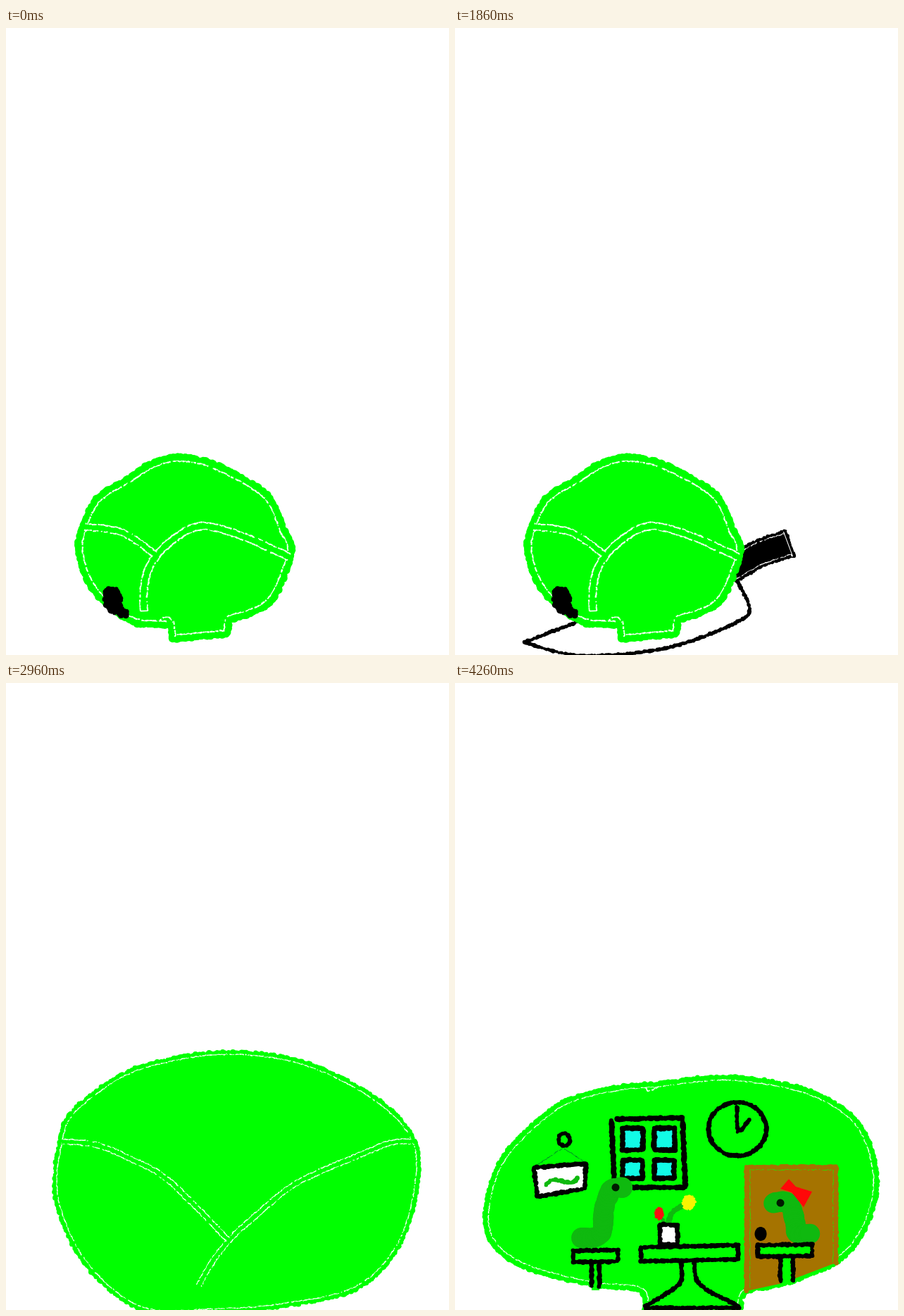
An HTML page with a canvas that plays this animation: 629x890 px, repeating every 5060 ms.

```html
<!DOCTYPE html>
<html lang="en">
<head>
<meta charset="utf-8">
<title>Cabbage</title>
<style>
  html, body { margin: 0; width: 100%; height: 100%; overflow: hidden; background: #fff; }
  canvas { display: block; }
</style>
</head>
<body>
<canvas id="stage" width="629" height="890"></canvas>
<script>
const W = 629, H = 890, LOOP = 5060;
const GREEN = '#00ff00', WORM = '#0fb90f', BROWN = '#a57300', CYAN = '#12fae6', BLACK = '#000';
const stage = document.getElementById('stage').getContext('2d');
let g, seed = 1;

const rnd = () => (seed = (seed * 16807) % 2147483647) / 2147483647;
const jit = a => (rnd() * 2 - 1) * a;
const mix = (a, b, t) => a + (b - a) * t;

function spline(a, b, c, d, t) {
  const curve = 2 * a - 5 * b + 4 * c - d;
  const twist = 3 * (b - c) + d - a;
  return b + t / 2 * (c - a + t * (curve + t * twist));
}

// Points every two pixels along key points given as x, y, x, y ...
function path(keys, { closed = false, straight = false } = {}) {
  const p = [], out = [];
  for (let i = 0; i < keys.length; i += 2) p.push([keys[i], keys[i + 1]]);
  const n = p.length, last = closed ? n : n - 1;
  const at = i => closed ? p[(i + n) % n] : p[Math.max(0, Math.min(n - 1, i))];
  for (let i = 0; i < last; i++) {
    const a = at(i - 1), b = at(i), c = at(i + 1), d = at(i + 2);
    const steps = Math.ceil(Math.hypot(c[0] - b[0], c[1] - b[1]) / 2);
    for (let s = 0; s < steps; s++) {
      const t = s / steps;
      const coord = k => straight ? mix(b[k], c[k], t) : spline(a[k], b[k], c[k], d[k], t);
      out.push([coord(0), coord(1)]);
    }
  }
  out.push(at(last));
  return out;
}

const curve = (...keys) => path(keys);
const ring = (...keys) => path(keys, { closed: true });
const line = (...keys) => path(keys, { straight: true });
const poly = (...keys) => path(keys, { closed: true, straight: true });
const rect = (x, y, w, h, tilt = 0) => poly(x, y, x + w, y + tilt, x + w, y + h + tilt, x, y + h);

function oval(x, y, rx, ry) {
  const out = [];
  for (let a = 0; a < 6.4; a += 2 / Math.max(rx, ry)) out.push([x + rx * Math.cos(a), y + ry * Math.sin(a)]);
  return out;
}

// Shifts a path sideways; positive is inward on a clockwise outline.
function shift(pts, d) {
  return pts.map(([x, y], i) => {
    const a = pts[Math.max(0, i - 2)], b = pts[Math.min(pts.length - 1, i + 2)];
    const dx = b[0] - a[0], dy = b[1] - a[1], len = Math.hypot(dx, dy) || 1;
    return [x - dy / len * d, y + dx / len * d];
  });
}

function crayon(pts, width, color = BLACK, rough = 1) {
  g.fillStyle = color;
  for (const [x, y] of pts) {
    g.beginPath();
    g.arc(x + jit(rough * .7), y + jit(rough * .7), width / 2 + jit(rough * .7), 0, 7);
    g.fill();
  }
}

function fill(pts, color) {
  g.fillStyle = color;
  g.beginPath();
  for (const [x, y] of pts) g.lineTo(x, y);
  g.fill();
}

function shape(pts, width, color, edge = BLACK, rough = 1) {
  fill(pts, color);
  crayon(pts, width, edge, rough);
}

// Thin broken line; without a colour it cuts through to the page.
function thread(pts, width, color) {
  g.save();
  if (!color) g.globalCompositeOperation = 'destination-out';
  g.strokeStyle = color || BLACK;
  let last;
  for (const [x, y] of pts) {
    const next = [x + jit(.8), y + jit(.8)];
    if (last && rnd() > .13) {
      g.lineWidth = width * (.55 + rnd() * .8);
      g.beginPath();
      g.moveTo(...last);
      g.lineTo(...next);
      g.stroke();
    }
    last = next;
  }
  g.restore();
}

// A green band between two threads.
function vein(pts, half, width, capped) {
  crayon(pts, half * 2 - 1, GREEN, 0);
  const a = shift(pts, half), b = shift(pts, -half).reverse();
  if (capped) thread([...a, ...b], width);
  else [a, b].forEach(side => thread(side, width));
}

function smallCabbage() {
  seed = 77;
  const rim = curve(228, 847, 178, 841, 125, 798, 104, 745, 110, 707, 130, 668, 172, 641, 212, 617,
    250, 610, 300, 622, 368, 662, 394, 712, 404, 746, 374, 815, 316, 840);
  const stem = line(316, 840, 314, 860, 237, 867, 233, 842);
  shape(rim, 10, GREEN, GREEN, 1.6);
  shape(stem, 10, GREEN, GREEN, 1.4);
  thread(shift(rim, 5), 1.9);
  thread(shift(stem, 5), 1.9);
  thread(curve(238, 845, 230, 836, 218, 840), 1.9);
  vein(curve(402, 751, 350, 727, 300, 710, 267, 709, 230, 732, 205, 762, 196, 795, 196, 827), 5, 1.9, true);
  vein(curve(112, 708, 165, 716, 211, 747), 4.5, 1.9);
  shape(ring(141, 800, 156, 797, 163, 817, 171, 832, 158, 832, 144, 822), 6, BLACK, BLACK, 2);
}

function flatKnife() {
  seed = 31;
  const top = curve(100, 732, 70, 727, 28, 714);
  const belly = curve(28, 714, 50, 770, 75, 790, 122, 802);
  const heel = line(403, 706, 421, 704, 426, 740, 435, 787, 400, 791);
  fill([...top, ...belly, ...heel.slice().reverse()], '#fff');
  [top, belly, heel].forEach(part => crayon(part, 6));
  const handle = poly(426, 702, 492, 694, 500, 726, 429, 734);
  shape(handle, 5, BLACK);
  thread(shift(handle, 2.5), 1.4);
}

function tiltedKnife() {
  seed = 53;
  const top = line(400, 750, 163, 847, 98, 872);
  const belly = curve(98, 872, 180, 891, 300, 880, 395, 846, 418, 825, 400, 784);
  fill([...top, ...belly], '#fff');
  [top, belly].forEach(part => crayon(part, 5));
  const handle = [...curve(396, 748, 425, 729, 469, 714), ...curve(482, 749, 440, 763, 400, 785)];
  shape(handle, 4, BLACK);
  crayon(line(469, 714, 482, 749), 4);
  thread(shift(handle, 3), 1.2);
}

function raisedKnife() {
  g.save();
  g.translate(58, -285);
  tiltedKnife();
  g.restore();
}

function bigCabbage() {
  seed = 11;
  const rim = ring(317, 524, 420, 538, 518, 585, 577, 644, 584, 710, 557, 800, 498, 859, 400, 883,
    300, 891, 192, 888, 112, 823, 71, 730, 78, 645, 98, 605, 165, 556, 230, 535);
  shape(rim, 6, GREEN, GREEN, 1.5);
  thread(shift(rim, 3), 1.3);
  vein(curve(575, 651, 545, 653, 500, 671, 440, 696, 400, 718, 350, 760, 316, 792, 290, 826, 274, 855),
    3.5, 1.3, true);
  vein(curve(81, 651, 130, 656, 180, 677, 223, 700, 266, 740, 315, 790), 3.5, 1.3);
}

function pictureAndWindow() {
  crayon(line(226, 705, 222, 621), 7);
  crayon(line(230, 619, 323, 617, 327, 716, 252, 716), 7);
  for (const x of [238, 283]) {
    shape(rect(x, 632, 29, 31), 7, CYAN);
    shape(rect(x, 677, 28, 26), 7, CYAN);
  }
  crayon(oval(155, 648, 8, 9), 5.5);
  thread(line(115, 685, 153, 660, 185, 680), .8, '#063');
  shape(poly(112, 688, 186, 682, 184, 718, 117, 729), 6, '#fff');
  crayon(curve(129, 712, 140, 705, 163, 709, 174, 703), 6, WORM);
}

function worms() {
  crayon(curve(180, 788, 207, 782, 212, 745, 222, 719, 238, 716), 28, WORM);
  crayon(curve(452, 738, 473, 738, 482, 760, 486, 781, 504, 782), 28, WORM);
  for (const [x, y] of [[228, 716], [462, 738]]) fill(oval(x, y, 5.5, 5.5), '#001a00');
  fill(poly(462, 718, 474, 704, 484, 715, 507, 722, 495, 744, 478, 723), '#ff0808');
}

function table() {
  crayon(curve(303, 766, 309, 752, 324, 741), 7, WORM);
  crayon(line(293, 759, 298, 768), 4, WORM);
  shape(oval(290, 753, 6, 8), 2, '#fb1010', '#fb1010');
  shape(oval(332, 737, 9, 10), 2, '#f8f400', '#f8f400');
  shape(rect(291, 769, 25, 28), 6, '#fff');
  shape(rect(264, 801, 138, 20, -3), 6, GREEN);
  crayon(curve(321, 823, 321, 848, 310, 860, 270, 885), 6);
  crayon(curve(340, 823, 343, 846, 357, 861, 402, 884), 6);
  crayon(line(271, 887, 403, 887), 6);
}

function stool(x, y, w, legs) {
  const [a, b] = legs;
  fill(rect(a, y + 10, b - a, 46), GREEN);
  shape(rect(x, y, w, 16, -1), 6, GREEN);
  legs.forEach(leg => crayon(line(leg, y + 18, leg, y + 51), 6));
}

function room() {
  seed = 5;
  const rim = curve(270, 890, 262, 862, 195, 854, 105, 831, 56, 798, 44, 750, 68, 674, 140, 604,
    190, 583, 240, 573, 289, 569, 390, 560, 500, 579, 572, 625, 598, 700, 584, 769, 543, 820,
    465, 853, 414, 864, 405, 890);
  shape(rim, 7, GREEN, GREEN, 1.5);
  thread(shift(rim, 4), 1.2);
  thread(line(269, 573, 274, 580, 290, 573), 1.5);

  fill(line(414, 863, 414, 687, 541, 687, 541, 823, 465, 852), BROWN);
  crayon(line(414, 863, 414, 687, 541, 687, 541, 823), 6, BROWN);
  thread(line(419, 858, 419, 691, 537, 691, 537, 822), 1, '#3fd000');

  pictureAndWindow();
  crayon(oval(401, 633, 41, 38), 6);
  crayon(line(400, 601, 401, 637, 408, 633, 418, 620), 5.5);
  worms();
  fill(oval(434, 782, 8.5, 10), BLACK);
  table();
  stool(168, 806, 63, [194, 205]);
  stool(430, 798, 77, [462, 480]);
}

function sheet(...parts) {
  const c = document.createElement('canvas');
  c.width = W;
  c.height = H;
  g = c.getContext('2d');
  parts.forEach(draw => draw());
  return c;
}

const scenes = [
  sheet(smallCabbage),
  sheet(raisedKnife, smallCabbage),
  sheet(flatKnife, smallCabbage),
  sheet(tiltedKnife, smallCabbage),
  sheet(bigCabbage),
  sheet(room)
];

// Each change runs in quarter steps of 100 ms from its start.
const starts = [800, 1160, 1560, 2660, 3960];

// The stronger scene sets the shape; the weaker one only tints what it covers.
function paint(i, quarter) {
  const late = quarter > 2;
  stage.clearRect(0, 0, W, H);
  stage.drawImage(scenes[late ? i + 1 : i], 0, 0);
  if (quarter % 4 === 0) return;
  stage.save();
  stage.globalAlpha = (late ? 4 - quarter : quarter) / 4;
  stage.globalCompositeOperation = 'source-atop';
  stage.drawImage(scenes[late ? i : i + 1], 0, 0);
  stage.restore();
}

let shown;
function tick() {
  const t = performance.now() % LOOP;
  const i = Math.max(0, starts.filter(s => s <= t).length - 1);
  const quarter = Math.max(0, Math.min(4, 1 + Math.floor((t - starts[i]) / 100)));
  const key = i * 5 + quarter;
  if (key !== shown) paint(i, quarter);
  shown = key;
  requestAnimationFrame(tick);
}
tick();
</script>
</body>
</html>
```
